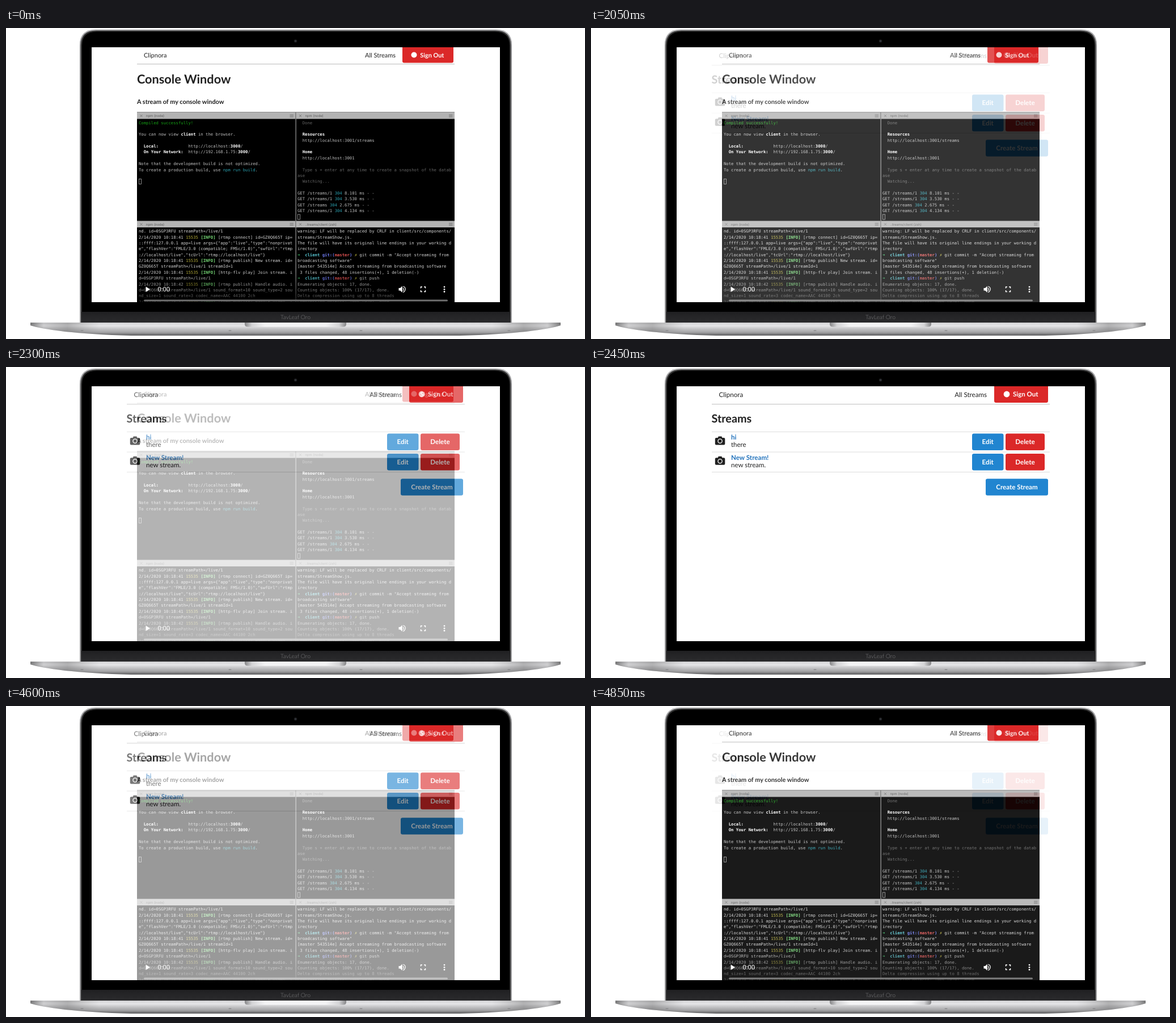
An HTML page for the animation above (4900 ms loop, 1021 by 549 pixels).

```html
<!DOCTYPE html>
<html lang="en">
<head>
<meta charset="utf-8">
<title>Stream pages on a laptop</title>
<style>
html, body { margin: 0; width: 100%; height: 100%; overflow: hidden; background: #fff; }
svg { display: block; width: 100%; height: 100%; }
text { white-space: pre; text-rendering: geometricPrecision; font-family: Lato, sans-serif; fill: #212121; }
.b { font-weight: 700; }
.w { fill: #fff; }
.link { fill: #2474bd; font-weight: 700; }
.tab { font: 5.9px Inter, sans-serif; fill: #5c5c5c; }
.clock { font: 11.2px Roboto, sans-serif; fill: #fff; }
.brand { font-weight: 300; fill: #7c7c7e; }
.term { font: 7.287px "DejaVu Sans Mono", monospace; fill: #bdbdbd; }
.lit { fill: #d2d2d2; }
.term .g { fill: #16a016; }
.term .h { fill: #fff; font-weight: 700; }
.term .c { fill: #2a9fae; }
.term .d { fill: #626262; }
.term .y { fill: #b5ad3a; }
.term .i { fill: #7be07b; font-weight: 700; }
.term .a { fill: #3fc46a; font-weight: 700; }
.term .k { fill: #58c8d4; font-weight: 700; }
.term .u { fill: #6a76e8; font-weight: 700; }
.term .r { fill: #e05252; font-weight: 700; }
</style>
</head>
<body>
<svg viewBox="0 0 1021 549" preserveAspectRatio="none">
  <defs>
    <linearGradient id="rim" x2="0" y2="1">
      <stop offset="0" stop-color="#b4b4b6"/><stop offset=".06" stop-color="#8c8c8e"/><stop offset="1" stop-color="#9c9c9e"/>
    </linearGradient>
    <linearGradient id="chin" x2="0" y2="1">
      <stop offset="0" stop-color="#202022"/><stop offset="1" stop-color="#2b2b2d"/>
    </linearGradient>
    <linearGradient id="base" x2="0" y2="1">
      <stop offset="0" stop-color="#d2d2d4"/><stop offset=".25" stop-color="#e6e6e8"/>
      <stop offset=".45" stop-color="#c9c9cb"/><stop offset=".75" stop-color="#a2a2a4"/><stop offset="1" stop-color="#5a5a5c"/>
    </linearGradient>
    <linearGradient id="ends">
      <stop offset="0" stop-color="#333" stop-opacity=".6"/><stop offset=".025" stop-color="#555" stop-opacity=".15"/>
      <stop offset=".07" stop-color="#555" stop-opacity=".35"/><stop offset=".13" stop-color="#777" stop-opacity="0"/>
      <stop offset=".87" stop-color="#777" stop-opacity="0"/><stop offset=".93" stop-color="#555" stop-opacity=".35"/>
      <stop offset=".975" stop-color="#555" stop-opacity=".15"/><stop offset="1" stop-color="#333" stop-opacity=".6"/>
    </linearGradient>
    <linearGradient id="notch">
      <stop offset="0" stop-color="#858587"/><stop offset=".07" stop-color="#d4d4d6"/><stop offset=".2" stop-color="#f4f4f5"/>
      <stop offset=".8" stop-color="#f4f4f5"/><stop offset=".93" stop-color="#d4d4d6"/><stop offset="1" stop-color="#858587"/>
    </linearGradient>
    <linearGradient id="fade" x2="0" y2="1">
      <stop offset="0" stop-opacity="0"/><stop offset=".5" stop-opacity=".35"/><stop offset="1" stop-opacity=".75"/>
    </linearGradient>
    <clipPath id="screen"><rect x="151" y="34" width="720" height="450"/></clipPath>
  </defs>

  <path d="M130 521V30Q130 2.5 158 2.5H864Q892 2.5 892 30V521Z" fill="url(#rim)"/>
  <path d="M132 521V30Q132 4.5 159 4.5H863Q890 4.5 890 30V521Z" fill="#333"/>
  <path d="M134 521V31Q134 6.500 160 6.500H862Q888 6.500 888 31V521Z"/>
  <rect x="133" y="501" width="756" height="20" fill="url(#chin)"/>
  <circle cx="510.500" cy="23" r="2.800" fill="#1c1c1e"/>
  <circle cx="510.500" cy="23" r="1.200" fill="#3a4048"/>
  <text class="brand" x="510.500" y="514" font-size="10.300" text-anchor="middle">TavLeaf Oro</text>
  <g id="foot">
    <path id="slab" d="M43 520H978V525C958 532 895 541 800 543H221C126 541 63 532 43 525Z" fill="url(#base)"/>
    <path d="M43 520H978V525C958 532 895 541 800 543H221C126 541 63 532 43 525Z" fill="url(#ends)"/>
    <path d="M421 520H600V523Q600 527.500 594 527.500H427Q421 527.500 421 523Z" fill="url(#notch)"/>
  </g>
  <rect x="151" y="34" width="720" height="450" fill="#fff"/>
  <g clip-path="url(#screen)">
    <g id="player"></g>
    <g id="list" opacity="0"></g>
  </g>
</svg>
<script>
const RED = '#db2828', BLUE = '#2185d0';
const esc = s => s.replace(/&/g, '&amp;').replace(/</g, '&lt;');
const rect = (x, y, w, h, fill, r = 0) =>
  `<rect x="${x}" y="${y}" width="${w}" height="${h}" rx="${r}" fill="${fill}"/>`;
const text = (x, y, size, s, cls = '', anchor = 'start') =>
  `<text x="${x}" y="${y}" font-size="${size}" class="${cls}" text-anchor="${anchor}">${esc(s)}</text>`;
const path = (d, fill = '#fff', extra = '') => `<path d="${d}" fill="${fill}" ${extra}/>`;
const dot = (x, y, r, fill = '#fff') => `<circle cx="${x}" cy="${y}" r="${r}" fill="${fill}"/>`;

function button(x, y, w, h, label, fill) {
  return rect(x, y, w, h, fill, 3.3) + text(x + w / 2, y + h / 2 + 4, 11.6, label, 'b w', 'middle');
}

// "§x...§" marks a run with class x
function term(x, y, lines, cls = '') {
  return lines.map((line, n) => {
    const runs = line.split('§').map((s, i) =>
      i % 2 ? `<tspan class="${s[0]}">${esc(s.slice(1))}</tspan>` : esc(s)).join('');
    return line && `<text class="term ${cls}" x="${x}" y="${(y + n * 10.38).toFixed(2)}">${runs}</text>`;
  }).join('');
}

function tab(x, y, w, label) {
  const cx = x + 7.5, cy = y + 6;
  let s = rect(x, y, w, 11.5, '#b3b3b3') + text(x + 16, y + 8.2, 5.9, label, 'tab');
  s += path(`M${cx - 2} ${cy - 2}l4 4m0-4l-4 4`, 'none', 'stroke="#666" stroke-width=".7"');
  for (let i = 0; i < 3; i++) s += rect(x + w - 10, y + 3.6 + i * 2, 6.5, 0.9, '#777');
  return s;
}

const cursor = (x, y) =>
  `<rect x="${x}" y="${y}" width="4" height="9" fill="none" stroke="#aaa" stroke-width=".8"/>`;

const log = (sec, rest) => `2/14/2020 10:18:${sec} §y15535§ §i[INFO]§ ${rest}`;
const prompt = cmd => `§a➜§  §kclient§ §ugit:(§§rmaster§§u)§ §y✗§ ${cmd}`;
const hit = (route, ms) => `GET ${route} §c304§ ${ms} ms - -`;

function drawPlayer() {
  let s = text(243, 52, 11, 'Clipnora') + text(687, 52, 11, 'All Streams', '', 'end');
  s += rect(699, 30, 90, 31.5, RED, 3) + dot(719.5, 47.5, 5);
  s += text(751.3, 51.5, 10.9, 'Sign Out', 'b w', 'middle');
  s += rect(231, 63, 560, 1.2, '#c4c4c4');
  s += text(231, 97.5, 21.7, 'Console Window', 'b');
  s += text(231, 134, 10.9, 'A stream of my console window', 'b');

  s += rect(231, 148, 560, 336, '#000') + rect(231, 148, 560, 1, '#8a8a8a');
  s += rect(510.5, 149, 1.3, 335, '#8e8e8e');
  s += tab(231, 149, 279.5, 'npm (node)') + tab(511.5, 149, 279.5, 'npm (node)');
  s += tab(231, 340.5, 279.5, 'npm (node)') + tab(511.5, 340.5, 279.5, '..treams/client (zsh)');

  s += term(234, 169.5, [
    '§gCompiled successfully!§', '',
    'You can now view §hclient§ in the browser.', '',
    '  §hLocal:§            http://localhost:§h3000§/',
    '  §hOn Your Network:§  http://192.168.1.75:§h3000§/', '',
    'Note that the development build is not optimized.',
    'To create a production build, use §cnpm run build§.'
  ]);
  s += cursor(234.5, 266.5);
  s += term(514, 169.5, [
    '  §dDone§', '',
    '  §hResources§', '  http://localhost:3001/streams', '',
    '  §hHome§', '  http://localhost:3001', '',
    '§d  Type s + enter at any time to create a snapshot of the datab§',
    '§dase§', '§d  Watching...§', '',
    hit('/streams/1', '8.101'), hit('/streams/1', '3.530'),
    hit('/streams', '2.675'), hit('/streams/1', '4.134')
  ]);
  s += cursor(514.5, 329);
  s += term(234, 361.2, [
    'nd. id=0SGP3RFU streamPath=/live/1',
    log(41, '[rtmp connect] id=GZ0Q665T ip='),
    '::ffff:127.0.0.1 app=live args={"app":"live","type":"nonprivat',
    'e","flashVer":"FMLE/3.0 (compatible; FMSc/1.0)","swfUrl":"rtmp',
    '://localhost/live","tcUrl":"rtmp://localhost/live"}',
    log(41, '[rtmp publish] New stream. id='),
    'GZ0Q665T streamPath=/live/1 streamId=1',
    log(41, '[http-flv play] Join stream. i'),
    'd=0SGP3RFU streamPath=/live/1',
    log(42, '[rtmp publish] Handle audio. i'),
    'd=GZ0Q665T streamPath=/live/1 sound_format=10 sound_type=2 sou',
    'nd_size=1 sound_rate=3 codec_name=AAC 44100 2ch',
    log(42, '[rtmp publish] Handle video. i')
  ], 'lit');
  s += term(514, 361.2, [
    'warning: LF will be replaced by CRLF in client/src/components/',
    'streams/StreamShow.js.',
    'The file will have its original line endings in your working d',
    'irectory',
    prompt('git commit -m "Accept streaming from'),
    'broadcasting software"',
    '[master 543514e] Accept streaming from broadcasting software',
    ' 3 files changed, 48 insertions(+), 1 deletion(-)',
    prompt('git push'),
    'Enumerating objects: 17, done.',
    'Counting objects: 100% (17/17), done.',
    'Delta compression using up to 8 threads',
    'Compressing objects: 100% (9/9), done.'
  ], 'lit');

  s += rect(231, 428, 560, 56, 'url(#fade)');
  s += path('M246.500 456.500V466L254 461.200Z') + text(267.5, 465.2, 11.2, '0:00', 'clock');
  s += path('M692.500 459H695.200L698.700 455.600V467L695.200 463.600H692.500Z');
  s += path('M700 458.600Q702.300 461.300 700 464M700.300 456Q705.600 458 703.700 463Q702.800 465.500 700.300 466.600',
    'none', 'stroke="#fff" stroke-width="1.200"');
  s += path('M731.500 459.500V457H734M737 457H739.500V459.500M739.500 463V465.500H737M734 465.500H731.500V463',
    'none', 'stroke="#fff" stroke-width="1.500"');
  for (let i = -1; i < 2; i++) s += dot(773, 461.3 + i * 4.2, 1.4);
  return s + rect(243, 479.5, 536, 3, '#6f6f6f', 1.5);
}

function camera(x, y) {
  return path(`M${x + 2} ${y + 2.5}H${x + 4.8}L${x + 6} ${y}H${x + 11.500}L${x + 12.700} ${y + 2.5}H${x + 15.500}` +
    `q2 0 2 2v8.500q0 2-2 2H${x + 2}q-2 0-2-2V${y + 4.5}q0-2 2-2Z`, '#212121') +
    `<circle cx="${x + 8.75}" cy="${y + 8.4}" r="3.600" fill="none" stroke="#fff" stroke-width="1.300"/>`;
}

function row(y, title, note) {
  return camera(218.8, y + 8) + text(247, y + 13.7, 11.6, title, 'link') + text(247, y + 27, 11.5, note) +
    button(672, y + 3.2, 55.5, 29.5, 'Edit', BLUE) + button(731, y + 3.2, 69, 29.5, 'Delete', RED);
}

function drawList() {
  let s = rect(151, 34, 720, 450, '#fff');
  s += text(225.5, 53, 11.6, 'Clipnora') + text(698, 53, 11.6, 'All Streams', '', 'end');
  s += rect(711, 30, 95, 33, RED, 3.3) + dot(733, 48, 5.4);
  s += text(766.3, 52, 11.5, 'Sign Out', 'b w', 'middle');
  s += rect(213, 65, 596, 1.2, '#c8c8c8');
  s += text(212.5, 97.5, 19.8, 'Streams', 'b');
  for (const y of [114, 149.6, 185]) s += rect(213, y, 596, 1, '#dcdcdc');
  s += row(114.4, 'hi', 'there') + row(149.8, 'New Stream!', 'new stream.');
  return s + button(696, 197.3, 110, 29.5, 'Create Stream', BLUE);
}

const $ = id => document.getElementById(id);
$('player').innerHTML = drawPlayer();
$('list').innerHTML = drawList();
$('foot').insertAdjacentHTML('beforeend',
  [134, 395, 626, 887].map(x => rect(x - 2.5, 533.5, 5, 1.5, '#8b8b8d', 0.7)).join(''));

// Each cross-fade moves in tenths, one every 50 ms.
const LOOP = 4900, STEP = 50;
const fade = (t, start) => Math.min(10, Math.max(0, Math.floor((t - start) / STEP) + 1)) / 10;

function render(t) {
  $('list').setAttribute('opacity', (fade(t, 2000) - fade(t, 4450)).toFixed(1));
}

const start = performance.now();
function tick() {
  render((performance.now() - start) % LOOP);
  requestAnimationFrame(tick);
}
render(0);
requestAnimationFrame(tick);
</script>
</body>
</html>
```
